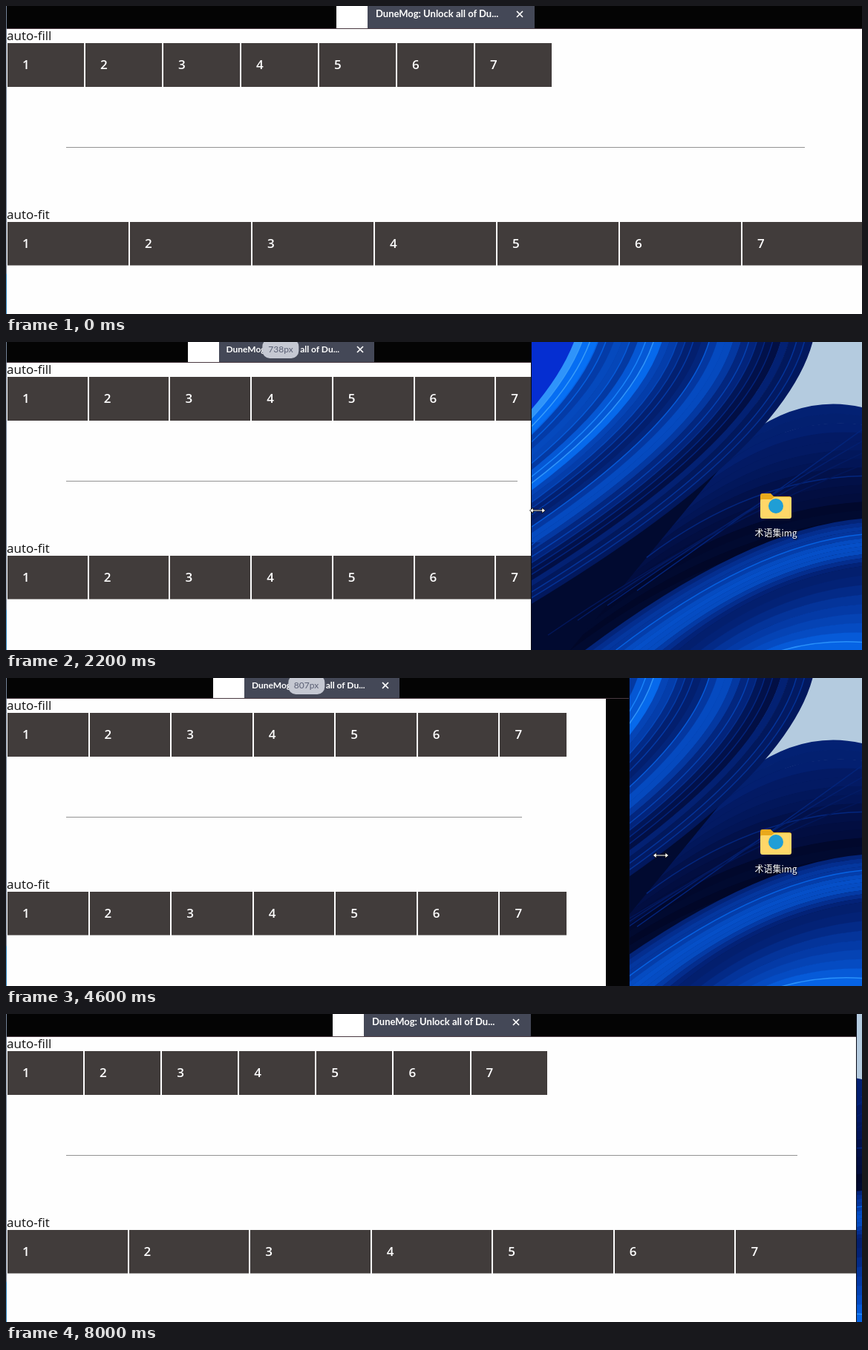
Write an HTML page with a canvas that moves like this. It is 1153 by 415 pixels and loops after 8100 ms.

```html
<!DOCTYPE html>
<html lang="en">
<head>
<meta charset="utf-8">
<title>auto-fill and auto-fit</title>
<style>
  html, body { margin: 0; width: 100%; height: 100%; overflow: hidden; background: #020a34; }
  #stage { position: relative; width: 1153px; height: 415px; overflow: hidden; }
  #stage > *, #win > *, .tabs > * { position: absolute; }
  #wall, #icons { left: 0; top: 0; }

  #win { left: 0; top: 0; height: 415px; overflow: hidden; background: #040404;
         box-sizing: border-box; border-right: 1px solid #060a18; }
  #rim { left: 0; top: 0; width: 1px; height: 415px;
         background: linear-gradient(#76849a 360px, #2f86c0 362px); }
  #view { left: 1px; height: 480px; background: #fefefe; overflow: hidden; }
  #page { font: 17px/19px "Open Sans", "Noto Sans", sans-serif; color: #111; }
  .name { position: relative; top: -1px; height: 19px; }
  .grid { display: grid; gap: 2px; padding: 0 1px; }
  .fill { grid-template-columns: repeat(auto-fill, minmax(98px, 1fr)); }
  .fit { grid-template-columns: repeat(auto-fit, minmax(98px, 1fr)); }
  .grid div { height: 58.6px; box-sizing: border-box; padding: 19px 20px 0;
              background: #413c3b; color: #fff; font-weight: 600; overflow: hidden; }
  .rule { height: 1px; margin: 81.2px 80px; background: #939393; }

  #head { left: 0; top: 0; width: 100%; border-bottom: 1px solid #4a3a42; }
  .tabs { position: absolute; top: 0; width: 267px; height: 100%; margin-left: -133.5px; background: #fff; }
  .tab { left: 42px; right: 0; top: 0; height: 100%; background: #444857; }
  .title { left: 53px; top: 1px; font: 700 13px/19px Lato, sans-serif; color: #fff; white-space: nowrap; }
  .close { right: 15px; top: 6px; }
  .compact .tabs { width: 251px; margin-left: -125.5px; }
  .compact .title { left: 52px; top: 0; font-size: 12px; }
  .compact .close { right: 14px; top: 5px; }
  #size { position: absolute; top: -3px; height: 26px; padding: 0 8px; border-radius: 10px;
          transform: translateX(-50%); background: #c5c8d2; color: #5b6075;
          font: 12px/27px Lato, sans-serif; }
  .compact #size { top: -4px; }
</style>
</head>
<body>
<div id="stage">
  <canvas id="wall" width="1153" height="415"></canvas>
  <svg id="icons" width="1153" height="415">
    <circle cx="659" cy="420" r="22" fill="#d8352b"/>
    <path d="M1016 207q0-3 3-3h11l4 4h21q3 0 3 3v10h-42z" fill="#e9a91c"/>
    <path d="M1016 214q0-2 2-2h13l4-3h21q2 0 2 2v24q0 3-3 3h-36q-3 0-3-3z" fill="#ffd768"/>
    <circle cx="1037" cy="221" r="10" fill="#1f9ed6"/>
    <text x="1037" y="262" text-anchor="middle" fill="#fff" font-size="12"
          font-family="'Noto Sans CJK SC', 'Noto Sans CJK', sans-serif"
          style="text-shadow:1px 1px 2px #000">术语集img</text>
  </svg>
  <div id="win">
    <div id="view">
      <div id="page">
        <div class="name">auto-fill</div><div class="grid fill"></div>
        <div class="rule"></div>
        <div class="name">auto-fit</div><div class="grid fit"></div>
      </div>
    </div>
    <div id="head">
      <div class="tabs">
        <div class="tab"></div>
        <div class="title">DuneMog: Unlock all of Du...</div>
        <svg class="close" width="10" height="10"><path d="M1 1l8 8M9 1l-8 8" stroke="#fff" stroke-width="1.7"/></svg>
      </div>
      <div id="size"></div>
    </div>
    <div id="rim"></div>
  </div>
  <svg id="drag" width="24" height="12" viewBox="-12 -6 24 12" style="left:-12px;top:-6px">
    <path d="M-10.5 0l4.5-3.8v2.9h12v-2.9l4.5 3.8l-4.5 3.8v-2.9h-12v2.9z" fill="#fff" stroke="#000" stroke-width=".8"/>
  </svg>
  <svg id="arrow" width="13" height="20">
    <path d="M.5.5v16l3.7-3.5l2.5 5.6l2.4-1l-2.4-5.4h5z" fill="#fff" stroke="#000"/>
  </svg>
</div>
<script>
const $ = id => document.getElementById(id);
const LOOP = 8100, STEP = 100;

// Where the drag changes speed: [ms, right edge of the window]
const DRAG = [[1100, 1156], [1600, 834], [1700, 834], [1800, 829], [2400, 648], [3100, 648],
  [3200, 642], [3300, 619], [3700, 619], [3800, 592], [4200, 592], [4400, 775], [4600, 840],
  [5000, 1016], [5100, 1016], [5200, 1030], [6100, 1140], [6300, 1140], [6400, 1146]];

function edgeAt(t) {
  const next = DRAG.findIndex(key => key[0] >= t);
  if (next < 1) return DRAG.at(next)[1];
  const [t0, x0] = DRAG[next - 1], [t1, x1] = DRAG[next];
  return Math.round(x0 + (x1 - x0) * (t - t0) / (t1 - t0));
}

function paintWall() {
  const c = $('wall').getContext('2d');
  const mix = (a, b, f) => a.map((v, i) => v + (b[i] - v) * f);
  const shade = v => `hsl(${230 - 22 * v} 95% ${8 + 55 * v}%)`;
  let seed = 7;
  const rand = () => (seed = seed * 16807 % 2147483647) / 2147483647;

  function line(p, v, w) {
    c.strokeStyle = shade(v);
    c.lineWidth = w;
    c.beginPath();
    c.moveTo(p[0], p[1]);
    c.quadraticCurveTo(...p.slice(2));
    c.stroke();
  }
  // Folded ribbon: strips between two quadratic curves, lit by light(0..1)
  function fan(a, b, n, light, rough = .1) {
    for (let i = 0; i < n; i++) {
      const p = mix(a, b, i / n), q = mix(a, b, (i + 1.05) / n);
      const v = Math.max(0, light(i / n) + (rand() - .5) * rough);
      c.fillStyle = shade(v);
      c.beginPath();
      c.moveTo(p[0], p[1]);
      c.quadraticCurveTo(...p.slice(2));
      c.lineTo(q[4], q[5]);
      c.quadraticCurveTo(q[2], q[3], q[0], q[1]);
      c.fill();
      if (rand() < rough * 2) line(p, v + .2, 1.5);
    }
  }

  c.fillStyle = shade(.03);
  c.fillRect(0, 0, 1153, 415);
  c.fillStyle = 'hsl(228 95% 42%)';
  c.fillRect(580, 0, 200, 190);
  c.fillStyle = '#b4cbdf';
  c.fillRect(1010, 0, 143, 122);

  const fold = [1153, 302, 1020, 320, 905, 415];
  fan([1153, 88, 1075, 70, 1000, 124], [1153, 250, 950, 270, 760, 415], 14, f => .3 - .34 * f, .05);
  fan([765, 0, 730, 90, 600, 190], [1086, 0, 1040, 170, 600, 415], 30,
    f => .68 - .55 * f + .14 * Math.cos(f * 20), .22);
  for (let i = 0; i < 4; i++)
    line([1153, 118 + 16 * i, 1040 - 30 * i, 200 + 15 * i, 850 - 40 * i, 335 + 20 * i], .3 - .04 * i, 1.5);
  fan([720, 270, 635, 330, 680, 415], [690, 270, 610, 330, 660, 415], 4, f => .3 + .2 * f);
  fan([1153, 238, 1000, 250, 780, 415], fold, 12, f => .26 + .3 * Math.sin(f * Math.PI), .1);
  fan(fold, [1153, 430, 1090, 420, 1040, 430], 10, f => .25 + .55 * f, .04);
}

function place(el, x, y, show) {
  el.style.visibility = show ? 'visible' : 'hidden';
  el.style.transform = `translate(${x}px, ${y}px)`;
}

const tabs = document.querySelector('.tabs');
const [head, view, page, size] = ['head', 'view', 'page', 'size'].map($);

function draw(t) {
  // Repainting trails the window edge: the outer page by one step, the grids by two
  const edge = edgeAt(t), before = edgeAt(t - STEP);
  const width = before - 1, layout = edgeAt(t - 2 * STEP) - 1;
  const top = width >= 820 ? 31 : width >= 700 ? 28 : -9;

  $('win').style.width = edge + 'px';
  view.style.top = top + 'px';
  view.style.width = width + 'px';
  page.style.width = layout + 'px';
  page.style.clipPath = `inset(0 ${Math.max(0, Math.round((width - layout) * .6))}px 0 0)`;
  head.className = top < 31 ? 'compact' : '';
  head.style.display = top < 0 ? 'none' : 'block';
  head.style.height = top - 1 + 'px';
  tabs.style.left = size.style.left = 1 + width / 2 + 'px';
  size.textContent = width + 'px';
  size.style.display = t >= 1300 && t < 7400 ? 'block' : 'none';

  // The pointer runs ahead of a growing window
  place($('drag'), Math.round(edge * 1.012 + Math.max(0, edge - before)), Math.round(215 + t * .0053),
    t >= 1200 && t < 6900);
  const first = t === 100;
  place($('arrow'), first ? 1127 : 1143, first ? 368 : 399, first || t === 7100);
}

for (const grid of document.querySelectorAll('.grid'))
  for (let i = 1; i <= 7; i++) grid.appendChild(document.createElement('div')).textContent = i;

paintWall();
draw(0);
const start = performance.now();
let last = 0;
function tick() {
  const t = Math.floor((performance.now() - start) % LOOP / STEP) * STEP;
  if (t !== last) draw(last = t);
  requestAnimationFrame(tick);
}
requestAnimationFrame(tick);
</script>
</body>
</html>
```
